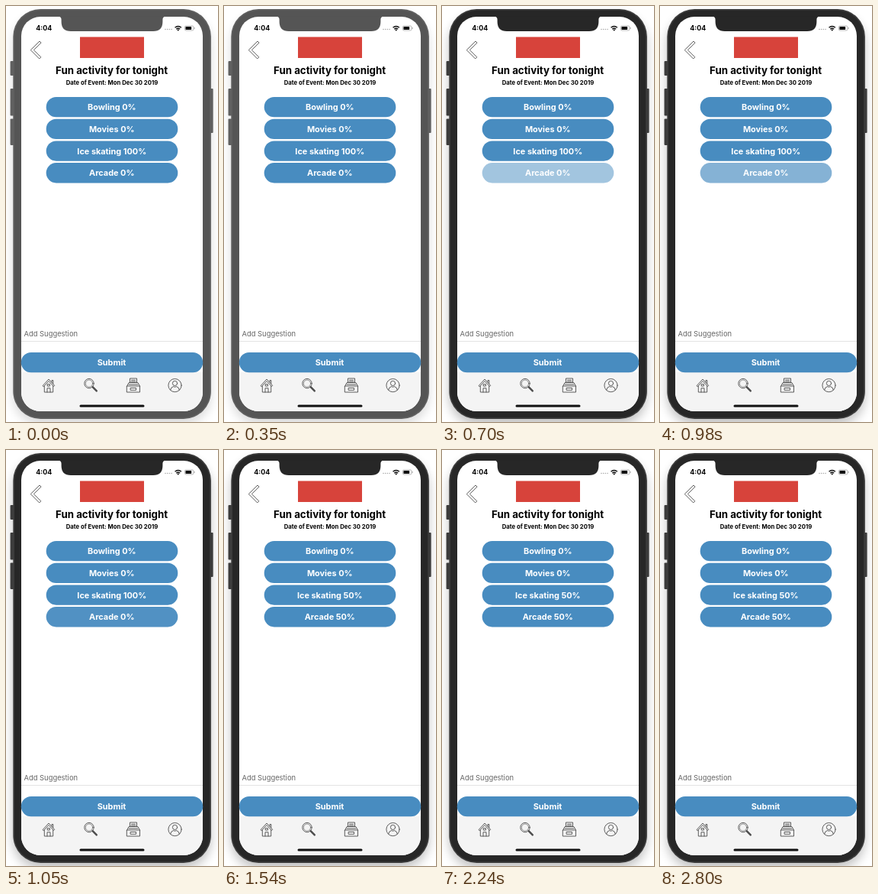
These frames come from a looping animation (278x544 px, 2.94 s). An HTML page:

```html
<!DOCTYPE html>
<html lang="en">
<head>
<meta charset="utf-8">
<title>Activity vote</title>
<style>
  html, body { margin: 0; width: 100%; height: 100%; overflow: hidden; background: #fff; }
  svg { display: block; width: 278px; height: 544px; }
  text { font-family: Inter, Roboto, sans-serif; }
  .bold { font-weight: 700; text-anchor: middle; }
  .label { font-size: 10.9px; fill: #fff; }
  .icon { fill: none; stroke: #4c4c4c; stroke-width: .9; stroke-linejoin: round; stroke-linecap: round; }
</style>
</head>
<body>
<svg viewBox="0 0 278 544" xmlns="http://www.w3.org/2000/svg">
  <defs>
    <filter id="blur" x="-20%" y="-20%" width="140%" height="140%">
      <feGaussianBlur stdDeviation="7"/>
    </filter>
    <clipPath id="screen"><rect x="20" y="14" width="238" height="516" rx="25"/></clipPath>
  </defs>
  <rect width="278" height="544" fill="#fff"/>
  <rect id="shadow" x="9" y="12" width="260" height="536" rx="38" filter="url(#blur)"/>

  <g id="rim">
    <rect x="5.6" y="72" width="5" height="19" rx="1"/>
    <rect x="5.6" y="108" width="5" height="35.5" rx="1"/>
    <rect x="5.6" y="147.5" width="5" height="34.5" rx="1"/>
    <rect x="267" y="108" width="4.6" height="58" rx="1"/>
    <rect x="9.3" y="4" width="259.6" height="536" rx="36"/>
  </g>
  <rect id="bezel" x="11" y="5.7" width="256.2" height="532.6" rx="34.3"/>
  <g clip-path="url(#screen)">
    <rect x="20" y="14" width="238" height="516" fill="#fff"/>
    <rect x="20" y="478.6" width="238" height="52" fill="#f4f4f4"/>
  </g>
  <path id="notch" d="M69 13.5 Q72.6 14 72.6 18 V20.5 Q72.6 33 85 33 H193 Q205.4 33 205.4 20.5 V18 Q205.4 14 209 13.5 Z"/>

  <!-- status bar -->
  <text class="bold" x="49.7" y="32" font-size="8.9">4:04</text>
  <g fill="#aaa">
    <circle cx="209" cy="30.5" r=".8"/><circle cx="211.7" cy="30.5" r=".8"/>
    <circle cx="214.4" cy="30.5" r=".8"/><circle cx="217.1" cy="30.5" r=".8"/>
  </g>
  <g fill="none" stroke="#111" stroke-width="1.4">
    <path d="M221.5 28.2 Q225.7 24.6 229.9 28.2"/>
    <path d="M223.2 30.2 Q225.7 28.2 228.2 30.2"/>
  </g>
  <circle cx="225.7" cy="31.6" r="1"/>
  <rect x="234.4" y="26" width="11.6" height="6" rx="1.7" fill="none" stroke="#999" stroke-width=".7"/>
  <rect x="235.4" y="27" width="7.8" height="4" rx=".8" fill="#111"/>
  <path d="M247 28v2" stroke="#999" stroke-width=".9"/>

  <!-- header -->
  <path class="icon" d="M43.7 46.3 L32.3 57.6 L43.7 69 L45.8 66.9 L36.4 57.6 L45.8 48.4 Z"/>
  <rect x="97" y="40.5" width="84" height="27.5" fill="#d7433b"/>
  <text class="bold" x="138.6" y="89" font-size="13.3">Fun activity for tonight</text>
  <text class="bold" x="139" y="103" font-size="7.75">Date of Event: Mon Dec 30 2019</text>

  <g id="options"></g>

  <!-- suggestion form -->
  <text x="23.5" y="432" font-size="9.4" fill="#666">Add Suggestion</text>
  <path d="M20 438.5H258" stroke="#ddd" stroke-width=".8"/>
  <rect x="19.8" y="453" width="238.4" height="26.3" rx="13.1" fill="#488cc0"/>
  <text class="bold label" x="138.5" y="470.2">Submit</text>

  <!-- tab bar -->
  <g class="icon">
    <path d="M48.3 496.4 L56 488 L63.7 496.4 L62.4 497.4 L56 490.6 L49.6 497.4 Z"/>
    <path d="M50.3 497 V505 H61.7 V497 M54 505 V499.8 H58 V505 M54.6 494.6 H57.4 V497 H54.6 Z M60 492 V489.5 H61.8 V494"/>
    <circle cx="109" cy="493.6" r="6.2"/><circle cx="109" cy="493.6" r="4.6" stroke-width=".6"/>
    <path d="M113.6 498.2 L118.8 503.4" stroke-width="2.4"/>
    <path d="M158.7 497 H175.5 V505 H158.7 Z M158.7 497 L161 492.6 H173 L175.5 497 M162.5 492.6 V487 H171.5 V492.6"/>
    <path d="M164.5 489.3 H169.5 M164 491.3 H170 M161 495 H173 M163.5 499.5 H170.5 V502.3 H163.5 Z"/>
    <circle cx="221.5" cy="496.1" r="8.6"/>
    <circle cx="221.5" cy="493.4" r="3.1"/>
    <path d="M215.6 502.1 Q216.3 498.1 219.7 497.6 Q221.5 499 223.3 497.6 Q226.7 498.1 227.4 502.1"/>
  </g>
  <rect x="96.5" y="521.4" width="85" height="3" rx="1.5" fill="#111"/>
</svg>
<script>
const LOOP = 2940, TICK = 70;
const FOCUS = 700, COUNTED = 1330;
const PRESS = 615, PRESSED = 765, RELEASE = 845, RELEASED = 1095;
const names = ['Bowling', 'Movies', 'Ice skating', 'Arcade'];
const byId = id => document.getElementById(id);

function add(parent, tag, attrs) {
  const node = document.createElementNS('http://www.w3.org/2000/svg', tag);
  for (const key in attrs) node.setAttribute(key, attrs[key]);
  return parent.appendChild(node);
}

const options = names.map((name, i) => {
  const y = 119 + i * 28.7;
  const group = add(byId('options'), 'g', {});
  add(group, 'rect', { x: 52.7, y, width: 172.6, height: 26.3, rx: 13.1, fill: '#488cc0' });
  const label = add(group, 'text', { class: 'bold label', x: 138.8, y: y + 17.2 });
  return { group, label };
});

const ease = p => p < .5 ? 2 * p * p : 1 - 2 * (1 - p) ** 2;
const progress = (t, from, to) => ease(Math.min(1, Math.max(0, (t - from) / (to - from))));

function draw(t) {
  const focused = t >= FOCUS;
  const glass = focused ? '#272727' : '#555';
  byId('rim').setAttribute('fill', focused ? '#3c3c3c' : '#606060');
  byId('bezel').setAttribute('fill', glass);
  byId('notch').setAttribute('fill', glass);
  byId('shadow').setAttribute('opacity', focused ? .24 : .14);

  const shares = t < COUNTED ? [0, 0, 100, 0] : [0, 0, 50, 50];
  options.forEach(({ label }, i) => { label.textContent = `${names[i]} ${shares[i]}%`; });

  const dim = progress(t, PRESS, PRESSED) - progress(t, RELEASE, RELEASED);
  options[3].group.setAttribute('opacity', 1 - .8 * dim);
}

const start = performance.now();
function frame() {
  const t = (performance.now() - start) % LOOP;
  draw(Math.floor(t / TICK) * TICK);
  requestAnimationFrame(frame);
}
frame();
</script>
</body>
</html>
```
